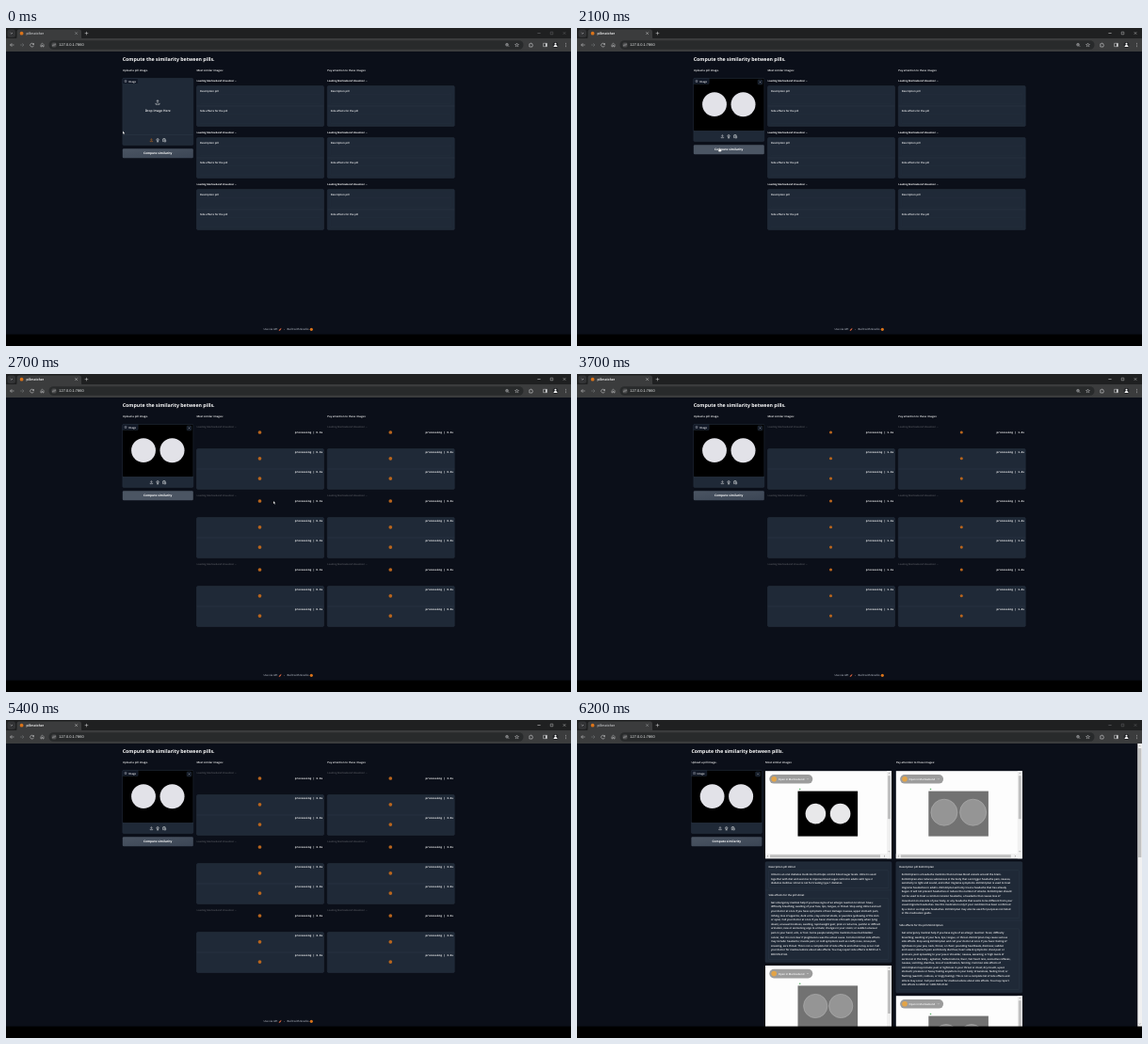
Write an HTML page that moves like this. It is 600 px wide and 338 px high and loops after 8000 ms.

```html
<!DOCTYPE html>
<html lang="en">
<head>
<meta charset="utf-8">
<title>Pill similarity</title>
<style>
html, body { margin: 0; width: 100%; height: 100%; overflow: hidden; background: #000; }
svg { display: block; width: 100vw; height: 100vh; }
text { font-family: "Open Sans", "Noto Sans", sans-serif; font-weight: 600; text-rendering: geometricPrecision; white-space: pre; }
.bold { font-weight: 700; }
.ui { font-family: Roboto, "Liberation Sans", sans-serif; font-weight: 500; }
.url { font-family: "Liberation Sans", sans-serif; font-weight: 400; }
.mono { font-family: "Liberation Mono", "DejaVu Sans Mono", monospace; font-weight: 700; }
.mid { text-anchor: middle; }
.end { text-anchor: end; }
</style>
</head>
<body>
<svg id="stage" viewBox="0 0 600 338" preserveAspectRatio="none"></svg>
<script>
const LOOP = 8000, STEP = 100;
const FOCUS = 1200, UPLOAD = 1400, PREVIEW = 1700, RUN = 2400, BLUR = 5900, DONE = 6200;
const PAGE = '#0b0f19', BLOCK = '#1f2937', LINE = '#323d4d', WHITE = '#fff', ORANGE = '#d9731a';
const stage = document.getElementById('stage');

// time, x, y of the pointer
const trail = [
  [0, 124, 109.6], [100, 123.8, 110], [200, 123.8, 110], [300, 123.4, 109.2], [400, 122.8, 108.4],
  [700, 122.8, 108.4], [800, 122.3, 107], [900, 121.8, 105.6], [1300, 121.8, 105.6], [1400, 126, 117],
  [1500, 132.5, 130.4], [1600, 137, 132.5], [1800, 145, 132], [2000, 151.3, 127.5], [2200, 151.3, 127.5],
  [2400, 178, 129], [2700, 284, 135], [3000, 511, 146]
];

const rect = (x, y, w, h, fill, r = 0, more = '') =>
  `<rect x="${x}" y="${y}" width="${w}" height="${h}" rx="${r}" fill="${fill}" ${more}/>`;
const dot = (x, y, r, fill, more = '') => `<circle cx="${x}" cy="${y}" r="${r}" fill="${fill}" ${more}/>`;
const text = (x, y, s, size, fill = WHITE, kind = '') =>
  `<text x="${x}" y="${y}" font-size="${size}" fill="${fill}" class="${kind}">${s}</text>`;
const line = (x, y, d, color, w = .5) =>
  `<path transform="translate(${x} ${y})" d="${d}" fill="none" stroke="${color}" stroke-width="${w}"/>`;
const edge = `stroke="${LINE}" stroke-width=".35"`;
const UP = 'M-.8.5L0-.5.8.5', DOWN = 'M-.8-.5L0 .5.8-.5', LEFT = 'M.5-.8L-.5 0 .5.8', RIGHT = 'M-.5-.8L.5 0-.5.8';

function chromeBar(focused) {
  const ink = focused ? '#f5f5f5' : '#bcbdbf', btn = focused ? '#e8e8e8' : '#77787a', icon = '#d8d9db', bar = '#3b3c3d';
  const cross = 'M-1.3-1.3L1.3 1.3M1.3-1.3L-1.3 1.3';
  return rect(0, 0, 600, 12, '#1f2021') +
    rect(1.5, 1.5, 8.5, 8.5, '#333436', 2.5) + line(5.8, 5.6, 'M-1.2-.6L0 .6 1.2-.6', icon) +
    `<path d="M9 12q2.5 0 2.5-2.5V4q0-2.5 2.5-2.5H77.5q2.5 0 2.5 2.5V9.5q0 2.5 2.5 2.5z" fill="${bar}"/>` +
    rect(0, 11, 600, 14, bar) +
    dot(16.6, 5.7, 1.9, ORANGE) + text(21.4, 7, 'pillmatcher', 3.7, ink, 'ui') +
    line(74.6, 5.6, cross, ink, .4) + line(85.5, 5.6, 'M-1.8 0H1.8M0-1.8V1.8', icon) +
    line(566, 5.5, 'M-1.6 0H1.6', btn) + line(579.5, 5.5, 'M-1.3-1.3H1.3V1.3H-1.3z', btn, .4) + line(593, 5.5, cross, btn, .4) +
    line(6.5, 18, 'M2 0H-2M-.2-1.8L-2 0-.2 1.8', icon) + line(17, 18, 'M-2 0H2M.2-1.8L2 0 .2 1.8', '#77787a') +
    line(27.6, 18, 'M1.7-.7A1.9 1.9 0 1 0 1.8.7M1.9-2V-.5H.4', icon) +
    line(38.5, 18, 'M-1.6-.3V1.9H-.5V.4H.5V1.9H1.6V-.3L0-1.9z', icon, .45) +
    rect(45.5, 13.2, 504, 9.6, '#282a2b', 4.8) +
    dot(51, 18, 3, bar) +
    line(51, 18, 'M-1.5-.8H.2M.6-.8a.5.5 0 1 0 1 0a.5.5 0 1 0-1 0M1.5.8H-.2M-.6.8a.5.5 0 1 0-1 0a.5.5 0 1 0 1 0', icon, .4) +
    text(56.3, 19.4, '127.0.0.1:7860', 3.95, '#f0f1f2', 'url') +
    line(532.2, 17.7, 'M-1.6 0a1.4 1.4 0 1 0 2.8 0a1.4 1.4 0 1 0-2.8 0M.8.9L2.1 2.2M-.9 0H.5M-.2-.7V.7', icon, .45) +
    line(542.5, 18, 'M0-2L.6-.6 2-.5.9.4 1.3 1.8 0 1-1.3 1.8-.9.4-2-.5-.6-.6z', icon, .4) +
    line(557.5, 18, 'M-1.7-1.2H-.6a.7.7 0 0 1 1.4 0H1.5V0a.7.7 0 0 1 0 1.2V2H-1.7z', icon, .55) +
    line(572.5, 18, 'M-1.9-1.7H1.9V1.7H-1.9z', icon, .5) + rect(573, 16.3, 1.4, 3.4, icon) +
    dot(583.5, 18, 2.9, '#202225') + dot(583.5, 16.8, 1, WHITE) +
    `<path d="M581.4 20q.3-1.9 2.1-1.9t2.1 1.9z" fill="#fff"/>` +
    [16.3, 18, 19.7].map(y => dot(594.5, y, .45, icon)).join('');
}

function icons(y, first) {
  const c = '#f3f4f6';
  return line(154.4, y, 'M-1.3.6V1.5H1.3V.6M0 .8V-1.5M-.9-.6L0-1.5.9-.6', first, .45) +
    line(161.1, y, 'M-1.2-.4a1.2 1.2 0 1 0 2.4 0a1.2 1.2 0 1 0-2.4 0M-.4-.4H.4M-1.1 1.7H1.1M0 .8V1.7', c, .5) +
    line(168, y, 'M-.5 1.5H-1.4V-1.3H1.2V-.4M-.7-1.6H.5M0 0H1.7V1.7H0z', c, .5);
}

function uploader(t) {
  const state = t < UPLOAD ? 0 : t < PREVIEW ? 1 : 2;
  const h = [71, 52, 67][state], bottom = 53.5 + h, hover = t >= 1900 && t <= 2700;
  const top = bottom + 3.8;
  let s = rect(123.8, 53.5, 75, h, BLOCK, 1.2, edge);
  if (state === 0) {
    s += line(161, 79, 'M-2 .8V2.2H2V.8M0 1V-2.3M-1.2-1.1L0-2.3 1.2-1.1', WHITE, .5) +
      text(161.2, 88.6, 'Drop Image Here', 3.3, WHITE, 'mid');
  } else if (state === 1) {
    s += text(161.2, 73.6, 'Uploading 1 file...', 3.15, WHITE, 'mid');
  } else {
    s += rect(124, 53.7, 74.6, 55.6, '#000', 1) +
      dot(146, 81.2, 12.9, '#e2e2e8') + dot(176.5, 81.2, 13, '#e2e2e8') +
      rect(192, 55, 5, 5, '#131a26', .8, edge) + line(194.5, 57.5, 'M-.8-.8L.8.8M.8-.8L-.8.8', '#d1d5db', .35);
  }
  s += line(124, bottom - 11, 'M0 0H74.6', LINE, .35) + icons(bottom - 5.3, state ? '#f3f4f6' : ORANGE) +
    `<path d="M123.8 59.6V54.7q0-1.2 1.2-1.2H140.2V58.4q0 1.2-1.2 1.2z" fill="#111826" ${edge}/>` +
    line(127, 56.5, 'M-1-1H1V1H-1zM-1 .7L0-.2 1 .7', '#cbd0d8', .3) + text(130, 57.5, 'Image', 2.7);
  return s + rect(123.8, top, 75, 10, hover ? '#4b5563' : 'url(#btn)', 1.2) +
    text(161.2, top + 6.1, 'Compute similarity', 3.2, WHITE, 'bold mid');
}

const heads = () =>
  text(123.8, 35.2, 'Compute the similarity between pills.', 5.22, WHITE, 'bold') +
  text(123.8, 46.4, 'Upload a pill image.', 2.85) +
  text(202.5, 46.4, 'Most similar images:', 2.85) +
  text(341.3, 46.4, 'Pay attention to these images:', 2.8);

const footer = () =>
  text(273.4, 321.4, 'Use via API', 2.85, '#a3a9b3') +
  `<path d="M289.6 322q.2-1.9 2.9-3.3q-.3 2.4-1.9 3z" fill="#d8613c"/>` +
  dot(295.4, 320.4, .3, '#a3a9b3') + text(298.4, 321.4, 'Built with Gradio', 2.85, '#a3a9b3') + dot(324.3, 320.3, 1.6, ORANGE);

const waiting = y => text(0, y, 'Loading Marlowbend Visualizer ...', 2.55, WHITE, 'bold');

function idleCell(x, y) {
  const field = (dy, label) => text(3.4, dy + 5.9, label, 2.72) +
    rect(3.4, dy + 8.6, 128, 10, BLOCK, .8, 'stroke="#293443" stroke-width=".3"');
  return `<g transform="translate(${x} ${y})">` + waiting(56.6) + rect(0, 61.6, 135, 42.8, BLOCK, 1.2, edge) +
    line(0, 83, 'M0 0H135', LINE, .3) + field(61.6, 'Description pill') + field(83, 'Side effects for the pill') + '</g>';
}

function busyCell(x, y, t) {
  const clock = ((t - 2350) / 1000).toFixed(1), r = 1.55 + .3 * Math.cos((t - 2700) / 2000 * Math.PI * 3);
  const spin = (cy, base) => dot(67, cy, r, '#b8651d') +
    text(133.8, base, `processing | ${clock}s`, 2.9, WHITE, 'mono end');
  return `<g transform="translate(${x} ${y})"><g opacity=".25">${waiting(56.6)}</g>` +
    rect(0, 79.6, 135, 42.8, BLOCK, 1.2, edge) + line(0, 101, 'M0 0H135', LINE, .35) +
    spin(62, 62.9) + spin(89.8, 83.8) + spin(111.1, 105) + '</g>';
}

const grid = (cell, gap) => [0, 1, 2].map(i => [202.5, 341.3].map(x => cell(x, i * gap)).join('')).join('');

const MED = 'Ulmet', BODY = 'MHO';
const notes = [{
  name: MED,
  about: `${MED} is an oral diabetes medicine that helps control blood sugar levels. ${MED} is used
together with diet and exercise to improve blood sugar control in adults with type 2
diabetes mellitus. ${MED} is not for treating type 1 diabetes.`,
  risks: `Get emergency medical help if you have signs of an allergic reaction to ${MED}: hives;
difficulty breathing; swelling of your face, lips, tongue, or throat. Stop using ${MED} and call
your doctor at once if you have symptoms of liver damage: nausea, upper stomach pain,
itching, loss of appetite, dark urine, clay-colored stools, or jaundice (yellowing of the skin
or eyes). Call your doctor at once if you have: shortness of breath (especially when lying
down), unusual tiredness, swelling, rapid weight gain; pink or red urine, painful or difficult
urination, new or worsening urge to urinate; changes in your vision; or sudden unusual
pain in your hand, arm, or foot. Some people taking this medicine have had bladder
cancer, but it is not clear if pioglitazone was the actual cause. Common ${MED} side effects
may include: headache; muscle pain; or cold symptoms such as stuffy nose, sinus pain,
sneezing, sore throat. This is not a complete list of side effects and others may occur. Call
your doctor for medical advice about side effects. You may report side effects to ${BODY} at 1-
800-555-0142.`
}, {
  name: 'Zolmitriptan',
  about: `Zolmitriptan is a headache medicine that narrows blood vessels around the brain.
Zolmitriptan also reduces substances in the body that can trigger headache pain, nausea,
sensitivity to light and sound, and other migraine symptoms. Zolmitriptan is used to treat
migraine headaches in adults. Zolmitriptan will only treat a headache that has already
begun. It will not prevent headaches or reduce the number of attacks. Zolmitriptan should
not be used to treat a common tension headache, a headache that causes loss of
movement on one side of your body, or any headache that seems to be different from your
usual migraine headaches. Use this medication only if your condition has been confirmed
by a doctor as migraine headaches. Zolmitriptan may also be used for purposes not listed
in this medication guide.`,
  risks: `Get emergency medical help if you have signs of an allergic reaction: hives; difficulty
breathing; swelling of your face, lips, tongue, or throat. Zolmitriptan may cause serious
side effects. Stop using Zolmitriptan and call your doctor at once if you have: feeling of
tightness in your jaw, neck, throat, or chest; pounding heartbeats, dizziness; sudden
and severe stomach pain and bloody diarrhea; heart attack symptoms: chest pain or
pressure, pain spreading to your jaw or shoulder, nausea, sweating; or high levels of
serotonin in the body - agitation, hallucinations, fever, fast heart rate, overactive reflexes,
nausea, vomiting, diarrhea, loss of coordination, fainting. Common side effects of
zolmitriptan may include: pain or tightness in your throat or chest; dry mouth, upset
stomach; pressure or heavy feeling anywhere in your body; drowsiness, feeling tired; or
flushing (warmth, redness, or tingly feeling). This is not a complete list of side effects and
others may occur. Call your doctor for medical advice about side effects. You may report
side effects to ${BODY} at 1-800-555-0142.`
}];

// Embedded viewer: kind 0 shows pale pills on black, kinds 1 and 2 grey ones
function viewer(x, y, kind) {
  const pill = (cx, cy, r) => kind ? dot(cx, cy, r, '#959595', 'stroke="#adadad" stroke-width=".7"') : dot(cx, cy, r, '#e8e8ea');
  const [a, b, cy, r] = [[53.4, 79.6, 45.4, 10.8], [51.1, 81.8, 44, 14], [53.2, 80.2, 43, 12.6]][kind];
  return `<g transform="translate(${x} ${y})">` + rect(0, 0, 134, 93, '#fdfdfd') +
    rect(129, 0, 5, 93, '#f1f1f1') + rect(0, 88, 134, 5, '#f1f1f1') +
    rect(130, 5, 3, 46, '#c1c1c1') + rect(5, 89, 117, 3, '#c1c1c1') +
    line(131.5, 2.6, UP, '#777') + line(131.5, 85.5, DOWN, '#777') +
    line(2.6, 90.5, LEFT, '#777') + line(126.5, 90.5, RIGHT, '#777') +
    rect(4.3, 3.8, 46, 9.6, '#9c9c9c', 4.8) + dot(9.2, 8.6, 2.8, '#e3a447') +
    text(13.8, 9.6, 'Open in Marlowbend', 2.72, WHITE) + line(45, 8.5, 'M-.9-.5L0 .5.9-.5', '#e8e8e8', .4) +
    dot(36.7, 19.3, .8, '#58b368') + rect(34.5, 21.4, 63.6, 48, kind ? '#727272' : '#000') +
    pill(a, cy, r) + pill(b, cy, r) + '</g>';
}

function report(x, note) {
  const GAP = 4.6, about = note.about.split('\n'), risks = note.risks.split('\n');
  const h1 = about.length * GAP + 5, h2 = risks.length * GAP + 5;
  const y2 = 159.7 + h1 + 2.4, end = y2 + 8.7 + h2 + 3.2;
  const area = (y, h, rows) => rect(3.4, y, 127.4, h, BLOCK, .8, edge) +
    rows.map((s, i) => text(5.9, y + 5.2 + i * GAP, s, 2.7)).join('');
  return `<g transform="translate(${x} 0)">` + rect(0, 150.8, 134, end - 150.8, BLOCK, 1.2, edge) +
    text(3.4, 157, 'Description pill ' + note.name, 2.72) + area(159.7, h1, about) +
    line(0, y2, 'M0 0H134', LINE, .3) +
    text(3.4, y2 + 6, 'Side effects for the pill ' + note.name, 2.72) + area(y2 + 8.7, h2, risks) + '</g>' +
    viewer(x, end + 3.4, 2);
}

const results = () =>
  viewer(200, 54.2, 0) + viewer(338.8, 54.2, 1) + report(200, notes[0]) + report(338.8, notes[1]) +
  rect(595.3, 25, 4.7, 301, '#f1f1f1') + rect(596, 30, 3.3, 116, '#c1c1c1') +
  line(597.7, 27.7, UP, '#777') + line(597.7, 323, DOWN, '#777');

function pointer(t) {
  if (t > 3000) return '';
  const i = trail.findIndex(k => k[0] >= t);
  const b = trail[i], a = trail[Math.max(i - 1, 0)];
  const f = b === a ? 0 : (t - a[0]) / (b[0] - a[0]);
  const x = a[1] + (b[1] - a[1]) * f, y = a[2] + (b[2] - a[2]) * f;
  const hand = t >= 1900 && t < 2300;
  const d = hand ? 'M-.4 0H.3V1.3L1.8 1.7V3.2L1.3 4H-.6L-1.5 2.5-1.1 2.1-.4 2.6z'
    : 'M0 0V3.1L.7 2.5 1.2 3.6 1.7 3.4 1.2 2.3H2.2z';
  return `<path transform="translate(${x} ${y})" d="${d}" fill="#fff" stroke="#222" stroke-width=".15"/>`;
}

function draw(t) {
  const done = t >= DONE;
  const body = done ? results() : t >= RUN ? grid((x, y) => busyCell(x, y, t), 73) : grid(idleCell, 55);
  stage.innerHTML =
    `<defs><linearGradient id="btn" x2="1" y2="1"><stop stop-color="#4b5563"/><stop offset="1" stop-color="#3b4554"/></linearGradient></defs>` +
    rect(0, 0, 600, 338, PAGE) +
    `<g transform="translate(${done ? -2.4 : 0} 0)">${heads()}${uploader(t)}</g>` +
    body + (done ? '' : footer()) +
    rect(0, 325.6, 600, 12.4, '#000') +
    chromeBar(t >= FOCUS && t < BLUR) + pointer(t);
}

let shown = -1;
const start = performance.now();
function tick() {
  const t = Math.floor((performance.now() - start) % LOOP / STEP) * STEP;
  if (t !== shown) draw(shown = t);
  requestAnimationFrame(tick);
}
tick();
</script>
</body>
</html>
```
